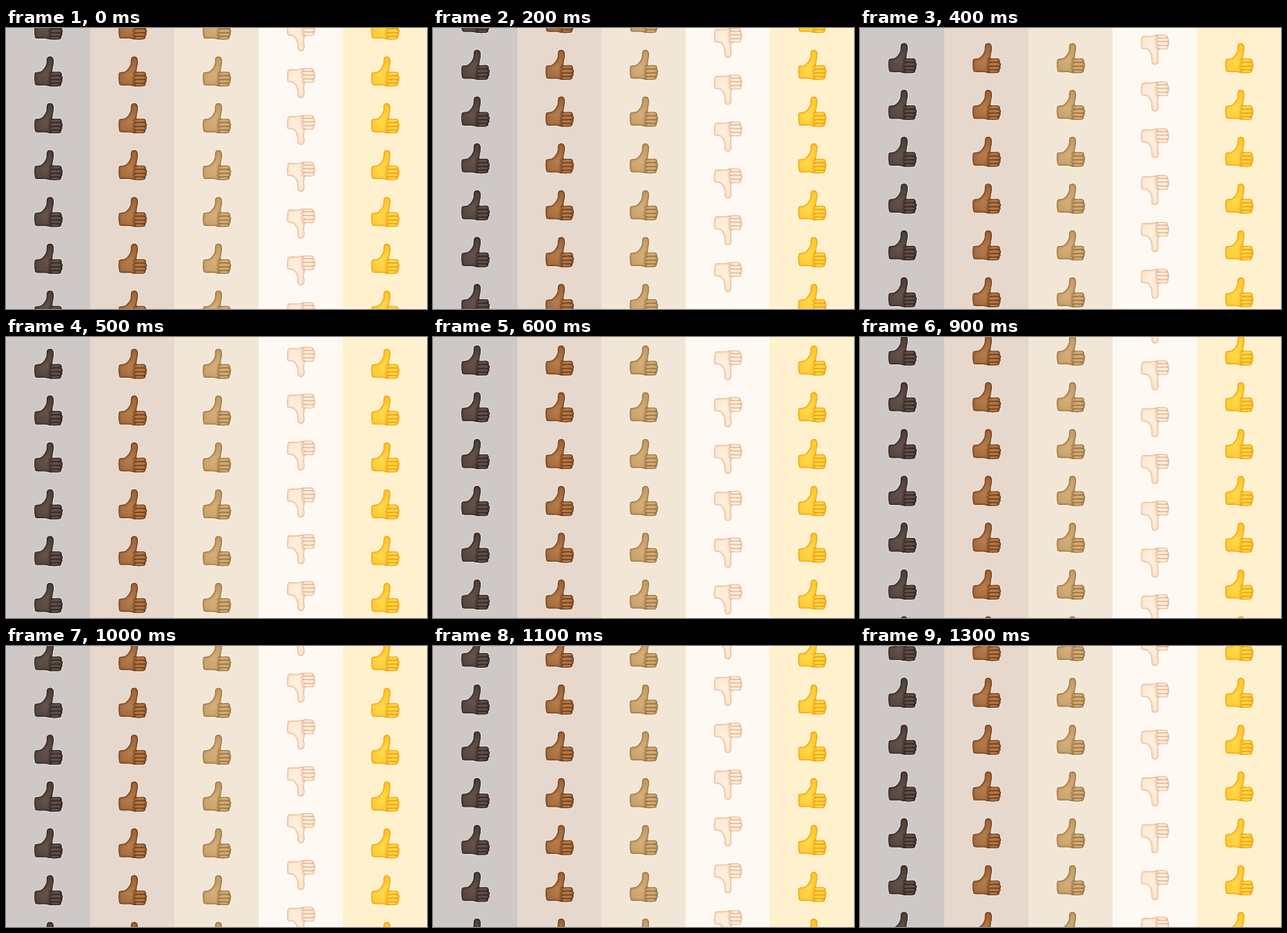
An HTML page that plays this animation: 600x400 px, repeating every 1400 ms.

```html
<!DOCTYPE html>
<html lang="en">
<head>
<meta charset="utf-8">
<title>Thumbs</title>
<style>
  html, body { margin: 0; width: 100%; height: 100%; overflow: hidden; }
  svg { display: block; width: 100vw; height: 100vh; }
</style>
</head>
<body>
<svg id="stage" viewBox="0 0 600 400"></svg>
<script>
const LOOP = 1400, STEP = 100, GAP = 400 / 6, WIDTH = 120;
const stage = document.getElementById('stage');

const columns = [
  { bg: '#cec9c6', light: '#64534b', base: '#4e3f38', edge: '#261b17' },
  { bg: '#e6d8cc', light: '#b67d4b', base: '#9b6338', edge: '#5b2c0e' },
  { bg: '#f2e7d6', light: '#d6ae78', base: '#c39b65', edge: '#815e30' },
  { bg: '#fef9f2', light: '#fff0dd', base: '#fde7d0', edge: '#dc9d78', down: true },
  { bg: '#fff1ce', light: '#ffda4a', base: '#ffc62c', edge: '#e98a06' }
];

// Outline of a hand about 41 by 43; lean moves the thumb sideways.
function outline(lean) {
  const x = v => v - lean, h = v => v - lean / 2;
  return `M1.2 23.2C4 22 7 22.8 9.5 21.6C${h(13)} 19.6 ${h(16.2)} 15.5 ${x(17.6)} 11
    C${x(18.2)} 8 ${x(17.4)} 5 ${x(18.4)} 2.6C${x(19.6)} -.2 ${x(24)} -.6 ${x(26.2)} 1.4
    C${x(28.5)} 3.8 ${x(28.4)} 8.5 ${x(27.4)} 12.5C${h(26.6)} 16 ${h(26.2)} 19 26 22.2
    L36 22C39.6 22 40.4 27 39 27.7C41.4 28.6 41.4 32.6 39.7 33.2C41 34.5 40.4 37.8 38.4 38.4
    C39.6 39.8 38.4 42.6 35.5 42.7C30 43.2 24 43.2 20 42.2C14 40.8 8 42 2.2 41
    C.2 38.5 0 26.5 1.2 23.2Z`;
}

const creases = 'M25 27.8Q33 27 39.2 27.8M24 33.3Q33 32.8 39.8 33.3M24 38.3Q32 38.1 38.5 38.5';
const knuckles = 'M26.5 22.3Q22.2 22.3 22.6 25.3Q23 27.8 25 27.8Q21.6 28.7 21.9 31Q22.1 33 24 33.3Q21.3 34.6 21.8 36.6Q22.4 38.2 24 38.3Q21.8 40 23.5 42.2';
const shine = 'M27 24.6H35.5M26 30.3H36.5M26 35.7H36M26 40.3H34.5';

function hand(c, i) {
  const d = outline(c.down ? 2.5 : 0);
  const line = (path, color, width, alpha) =>
    `<path d="${path}" stroke="${color}" stroke-width="${width}" stroke-opacity="${alpha}"/>`;
  return `<radialGradient id="skin${i}" gradientUnits="userSpaceOnUse" cx="17" cy="26" r="25">
      <stop stop-color="${c.light}"/><stop offset="1" stop-color="${c.base}"/>
    </radialGradient>
    <clipPath id="clip${i}"><path d="${d}"/></clipPath>
    <g id="hand${i}" fill="none" stroke-linecap="round" stroke-linejoin="round">
      ${line(d, '#fff', 2.4, .4)}
      <path d="${d}" fill="url(#skin${i})"/>
      <g clip-path="url(#clip${i})">
        ${line(d, c.edge, 6, .12)}
        ${line(d, c.edge, 3.6, .2)}
        ${line(d, c.edge, 1.7, .45)}
        ${line(shine, c.light, 2.4, .8)}
        ${line(knuckles, c.edge, 5, .12)}
        ${line(knuckles, c.edge, 2.4, .2)}
        ${line(knuckles, c.edge, .8, .45)}
        ${line(creases, c.edge, 1.9, .28)}
        ${line(creases, c.edge, .9, .75)}
      </g>
    </g>`;
}

function column(c, i) {
  const flip = c.down ? 'translate(0 43) scale(1 -1)' : '';
  let hands = '';
  for (let row = -2; row < 7; row++) {
    hands += `<use href="#hand${i}" transform="translate(0 ${row * GAP}) ${flip}"/>`;
  }
  return `<rect x="${i * WIDTH}" width="${WIDTH}" height="400" fill="${c.bg}"/>
    <g id="strip${i}">${hands}</g>`;
}

stage.innerHTML = `<defs>${columns.map(hand).join('')}</defs>` + columns.map(column).join('');
const strips = columns.map((c, i) => document.getElementById('strip' + i));

function draw(time) {
  const shift = Math.floor(time % LOOP / STEP) * STEP / LOOP * GAP;
  columns.forEach((c, i) => {
    const y = c.down ? 57 + shift : 40.3 - shift;
    strips[i].setAttribute('transform', `translate(${i * WIDTH + 40} ${y})`);
  });
}

function tick() {
  draw(performance.now());
  requestAnimationFrame(tick);
}
tick();
</script>
</body>
</html>
```
